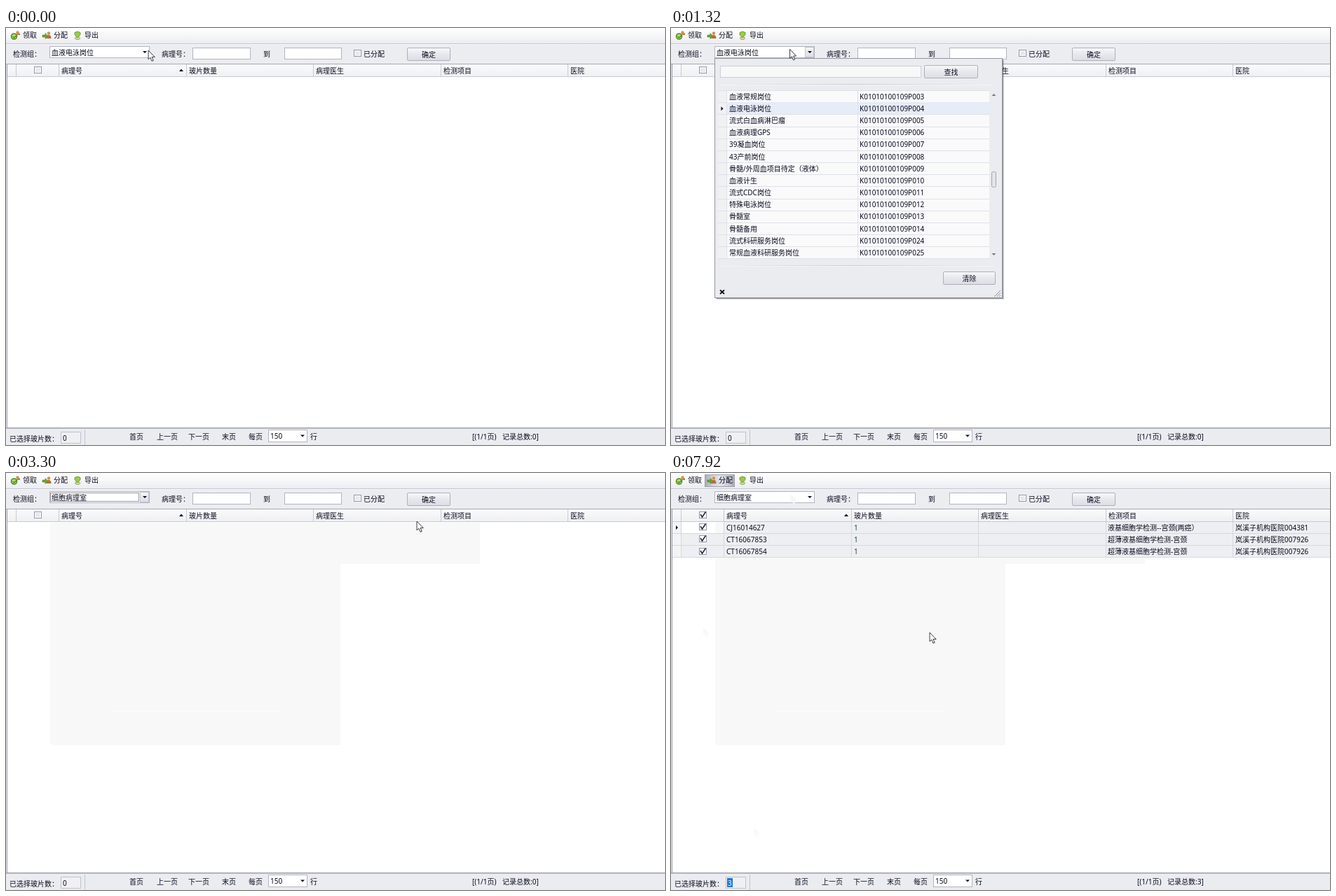
Animation, 940 px wide and 596 px high, one loop 8000 ms. Source, as an HTML page:

```html
<!DOCTYPE html>
<html lang="zh-CN">
<head>
<meta charset="utf-8">
<title>玻片分配</title>
<style>
html, body { margin: 0; width: 100%; height: 100%; overflow: hidden; background: #fff; }
svg { display: block; width: 940px; height: 596px; }
text { font-family: "Noto Sans", "Noto Sans CJK SC", "Noto Sans CJK", sans-serif; white-space: pre; }
</style>
</head>
<body>
<svg id="stage" viewBox="0 0 940 596" xmlns="http://www.w3.org/2000/svg"></svg>
<script>
const NS = 'http://www.w3.org/2000/svg';
const STEP = 330, LOOP = 8000, INK = '#0a0a1e', EDGE = '#b2b4c0';
const stage = document.getElementById('stage');
const layers = [];
let host = stage;

function el(tag, attrs, parent = host) {
  const node = document.createElementNS(NS, tag);
  for (const key in attrs) node.setAttribute(key, attrs[key]);
  parent.appendChild(node);
  return node;
}
function gradient(id, stops, across) {
  const g = el('linearGradient', across ? { id } : { id, x2: 0, y2: 1 }, stage);
  stops.forEach(([color, alpha = 1], i) =>
    el('stop', { offset: i / (stops.length - 1), 'stop-color': color, 'stop-opacity': alpha }, g));
}
const rect = (x, y, width, height, fill, more) => el('rect', { x, y, width, height, fill, ...more });
const box = (x, y, w, h, fill = '#fff', stroke = EDGE, more) =>
  rect(x + .5, y + .5, w - 1, h - 1, fill, { stroke, ...more });
const path = (d, fill, more) => el('path', { d, fill, ...more });
const stroke = (d, color, width = 1, more) =>
  path(d, 'none', { stroke: color, 'stroke-width': width, ...more });
const hline = (x1, x2, y, color) => rect(x1, y, x2 - x1, 1, color);
const vline = (x, y1, y2, color) => rect(x, y1, 1, y2 - y1, color);
function label(x, middle, words, size = 10, fill = INK, more) {
  const node = el('text', { x, y: middle + size * .37, 'font-size': size, fill, ...more });
  node.textContent = words;
}
// Everything drawn inside is visible for steps from <= n < to.
function layer(from, to, draw) {
  const outer = host;
  host = el('g', {}, outer);
  layers.push({ node: host, from, to });
  draw();
  host = outer;
}
function button(x, y, w, h, words, fill = 'url(#button)') {
  box(x, y, w, h, fill, '#adafbc', { rx: 1.5 });
  label(x + w / 2, y + h / 2 + .8, words, 10, INK, { 'text-anchor': 'middle' });
}
const triangle = (x, y, h = 3, fill = INK) => path(`M${x} ${y}h6l-3 ${h}z`, fill);
function checkbox(x, y, checked) {
  box(x, y, 11, 10, '#fff', '#9496a4');
  if (checked) stroke(`M${x + 2} ${y + 4}l2.5 4l5 -7.5`, '#262636', 1.6);
  else rect(x + 2, y + 2, 7, 6, '#e8e9ee');
}

gradient('toolbar', [['#fefefe'], ['#f7f7f9'], ['#ebecf0']]);
gradient('header', [['#fafafb'], ['#eff0f3']]);
gradient('button', [['#f8f8fa'], ['#e7e8ed'], ['#dcdee5']]);
gradient('hover', [['#ffffff'], ['#eef0f6'], ['#e4e7f0']]);
gradient('pressed', [['#a9abb4'], ['#cfd1d7'], ['#e3e4e8'], ['#cfd1d7'], ['#a9abb4']], true);
gradient('rule', [['#c9cbd3', 0], ['#c9cbd3'], ['#c9cbd3', 0]], true);
gradient('mist', [['#cbd5ce'], ['#d9e0da'], ['#dfe5df'], ['#cad3cb']]);
gradient('dusk', [['#8d9791', 0], ['#8d9791', .35], ['#6c7771', .8]], true);
gradient('shore', [['#4a544f', 0], ['#4a544f', .75], ['#6c7771', .3]]);

const COLUMNS = [14, 75, 257, 438, 620, 801];

function drawToolbar() {
  rect(0, 0, 940, 22, 'url(#toolbar)');
  hline(0, 940, 22, '#c3c5cf');
  layer(23, 25, () => box(48, 2, 43, 18, 'url(#pressed)', '#9fa1ab'));
  el('circle', { cx: 11.5, cy: 12, r: 4, fill: '#b7d977', stroke: '#4f8d1c', 'stroke-width': 1.6 });
  stroke('M9.5 12l2 2l4 -4', '#4f8d1c', 1.4);
  path('M13 10h7v-2l-2 -1z', '#b97a3d');
  el('circle', { cx: 16.5, cy: 6.5, r: 2.2, fill: '#c99354' });
  path('M52 10h4v-2.5l4 4l-4 4v-2.5h-4z', '#68a52c', { stroke: '#4c8320', 'stroke-width': .6 });
  el('circle', { cx: 61, cy: 7.5, r: 2.2, fill: '#c99354' });
  path('M57.5 15q0 -5 3.5 -5t3.5 5z', '#b56f35');
  el('ellipse', { cx: 102, cy: 14.5, rx: 3.6, ry: 1.8, fill: '#e9dfb0', stroke: '#8a9a45' });
  path('M98 6.5q4 -3 8 0v3l-4 4.5l-4 -4.5z', '#9ccb45', { stroke: '#5a8f26', 'stroke-width': .8 });
  [[24, '领取'], [68, '分配'], [112, '导出']].forEach(([x, s]) => label(x, 10.5, s));
}

function drawFilters() {
  rect(0, 23, 940, 28, '#ecedf1');
  hline(0, 940, 23, '#fafafb');
  hline(0, 940, 51, '#a7a9b6');
  label(10, 37.5, '检测组：');
  box(62, 26, 143, 17);
  layer(14, 25, () => ghost(170, 30, '#f6f6f7'));
  layer(0, 10, () => label(65, 35, '血液电泳岗位'));
  layer(10, 25, () => label(65, 35, '细胞病理室'));
  layer(3, 12, () => box(191, 27, 13, 15, 'url(#button)', '#c3c5cf'));
  layer(10, 12, () => box(63, 28, 127, 13, 'none', '#333', { 'stroke-dasharray': '1 1' }));
  triangle(195, 33);
  label(222, 37, '病理号：');
  box(266, 28, 83, 17);
  label(367, 37, '到');
  box(397, 28, 82, 17);
  checkbox(496, 31);
  label(510, 37.5, '已分配');
  button(572, 28, 62, 19, '确定');
  layer(11, 13, () => button(572, 28, 62, 19, '确定', 'url(#hover)'));
}

function drawHeader() {
  rect(0, 52, 940, 17, 'url(#header)');
  hline(0, 940, 69, '#c8cad2');
  COLUMNS.forEach(x => vline(x, 52, 69, '#c8cad2'));
  layer(0, 16, () => checkbox(40, 55));
  layer(16, 25, () => checkbox(40, 55, true));
  ['病理号', '玻片数量', '病理医生', '检测项目', '医院']
    .forEach((s, i) => label(COLUMNS[i + 1] + 4, 61, s));
  path('M247 62h6l-3 -3.5z', INK);
  rect(0, 52, 1, 520, '#e9e9ee');
  vline(1, 52, 572, '#9c9eab');
}

function drawRows() {
  const mid = i => 78 + i * 17.25;
  const tint = fill => path('M76 70H940V121H15V87H76z', fill);
  layer(16, 20, () => tint('#e0e9fb'));
  layer(20, 25, () => tint('#eeeff2'));
  rect(2, 70, 12, 51, '#f4f4f6');
  [86, 103, 120].forEach(y => hline(2, 940, y, '#d6d8de'));
  COLUMNS.forEach(x => vline(x, 70, 121, '#d6d8de'));
  path('M7 75l3 3l-3 3z', INK);
  const records = [
    ['CJ16014627', '液基细胞学检测--宫颈(两癌）', '岚溪子机构医院004381'],
    ['CT16067853', '超薄液基细胞学检测-宫颈', '岚溪子机构医院007926'],
    ['CT16067854', '超薄液基细胞学检测-宫颈', '岚溪子机构医院007926']];
  records.forEach(([code, test, place], i) => {
    label(79, mid(i), code);
    label(261, mid(i), '1', 10, '#1d4a35');
    label(623, mid(i), test);
    label(805, mid(i), place);
    const y = Math.round(mid(i)) - 6;
    layer(13, 16, () => checkbox(40, y));
    layer(16, 25, () => checkbox(40, y, true));
  });
  layer(16, 20, () => box(15, 70, 60, 16, 'none', '#444', { 'stroke-dasharray': '1 1' }));
}

function drawFooter() {
  rect(0, 572, 940, 24, '#ebecf0');
  rect(0, 571, 940, 1.5, '#9c9eab');
  vline(112, 574, 596, '#c3c5cf');
  label(5, 587, '已选择玻片数：');
  box(78, 577, 29, 17, '#f0f0f3', '#c0c2cc');
  layer(0, 16, () => label(81, 586.5, '0'));
  layer(16, 20, () => label(81, 586.5, '3'));
  layer(20, 25, () => {
    rect(80, 579, 8, 13, '#1979d3');
    label(81, 586.5, '3', 10, '#fff');
  });
  [[176, '首页'], [215, '上一页'], [260, '下一页'], [308, '末页'], [346, '每页'], [434, '行']]
    .forEach(([x, s]) => label(x, 584, s));
  box(374, 574, 56, 18);
  label(377, 583.5, '150');
  triangle(420, 581.5);
  label(665, 584, '[(1/1页)');
  layer(0, 13, () => label(708, 584, '记录总数:0]'));
  layer(13, 25, () => label(708, 584, '记录总数:3]'));
}

function drawList(rows, mark) {
  const pitch = 17.17, top = 89;
  rect(67, top, 387, 240, '#fafafb');
  rect(67, top, 13, rows.length * pitch, '#f1f1f4');
  rows.forEach(([name, code], i) => {
    const y = top + i * pitch;
    if (i === mark) rect(80, y, 374, pitch, '#e6ecf8');
    hline(67, 454, Math.round(y + pitch), '#dfe1e7');
    label(83, y + 9, name);
    label(269, y + 9, code);
  });
  hline(67, 454, top, '#dfe1e7');
  [79, 266].forEach(x => vline(x, top, top + rows.length * pitch, '#dfe1e7'));
  const y = top + mark * pitch + 9;
  path(`M71.5 ${y - 3}l3 3l-3 3z`, INK);
}

function drawPopup() {
  rect(65, 46, 410, 342, '#000', { opacity: .16 });
  rect(64, 45, 410, 342, '#000', { opacity: .3 });
  box(62, 43, 411, 343, '#ebecf0', '#9395a2');
  box(70, 54, 287, 17, '#f8f8f9', '#cccfd7');
  button(361, 53, 77, 19, '查找');
  rect(70, 80, 390, 1, 'url(#rule)');
  rect(70, 81, 390, 1, '#fff', { opacity: .5 });
  rect(70, 339, 390, 1, 'url(#rule)');
  rect(70, 340, 390, 1, '#fff', { opacity: .5 });
  button(388, 348, 75, 19, '清除');
  stroke('M70 374.5l6 5.5M76 374.5l-6 5.5', '#111', 1.8);
  stroke('M461 384l9 -9M464.5 384l5.5 -5.5M468 384l2 -2', '#8f919d');

  const code = n => 'K01010100109P' + String(n).padStart(3, '0');
  const names = ['血液常规岗位', '血液电泳岗位', '流式白血病淋巴瘤', '血液病理GPS', '39凝血岗位',
    '43产前岗位', '骨髓/外周血项目待定（液体）', '血液计生', '流式CDC岗位', '特殊电泳岗位',
    '骨髓室', '骨髓备用', '流式科研服务岗位', '常规血液科研服务岗位'];
  const all = names.map((name, i) => [name, code(i < 12 ? i + 3 : i + 12)]);
  const found = [['细胞遗传室', code(31)], ['细胞病理室', code(32)]];
  layer(3, 7, () => {
    drawList(all, 1);
    box(457, 205, 7, 23, '#e3e4ea', '#a4a6b3', { rx: 2 });
    triangle(457.5, 322, 3, '#777987');
    path('M457.5 97h6l-3 -3z', '#777987');
  });
  layer(7, 9, () => drawList(found, 0));
  layer(9, 10, () => drawList(found, 1));
  layer(3, 4, () => vline(73, 56, 68, '#111'));
  layer(6, 10, () => label(73, 62.5, '细胞'));
}

function drawLandscape() {
  const dark = '#38423e';
  rect(550, 74, 125, 55.5, 'url(#dusk)', { rx: 4 });
  path('M570 110q28 -10 50 -9t56 -11v20z', '#7e8983', { opacity: .5 });
  path('M638 109q4 -18 14 -22t24 -3v25z', '#5a655f', { opacity: .55 });
  rect(598, 106, 77, 22, 'url(#shore)');
  path('M604 97q12 -3 19 -12q7 9 20 12l-3 2h-33z', dark);
  rect(610, 99, 27, 9, '#5f6a64', { opacity: .55 });
  [609, 617, 627, 635].forEach(x => rect(x, 98, 2, 11, dark));
  path('M600 108h76v4l-40 2l-36 -2z', dark, { opacity: .8 });
  stroke('M647 108q2 -14 -3 -22M655 108q-2 -15 8 -24M664 108q0 -13 8 -17', '#434d48');
  stroke('M605 118h62M602 123h70', dark, 1.2, { opacity: .5 });
  [[578, 83], [584, 81], [589, 86], [579, 89], [585, 91]].forEach(([x, y]) =>
    stroke(`M${x - 2} ${y - 1}q2 -1 2 1q1 -2 3 -1`, '#4a544e'));
}

function drawCandidates() {
  const tone = '#23423f';
  rect(78.5, 73.5, 597, 56.5, 'url(#mist)', { rx: 5, stroke: '#b1bab3' });
  drawLandscape();
  label(88, 89.5, "xi'bc", 13, tone, { 'font-weight': 600 });
  vline(116, 83, 97, '#223');
  label(148, 89.5, "[xi'bao]", 13, '#f47a10', { 'font-weight': 600 });
  hline(88, 570, 102, '#b9c3bb');
  ['细胞', '喜报', '喜宝', '西宝', '希宝', '西堡', '稀薄'].forEach((word, i) =>
    label(88 + i * 49.8, 117, `${i + 1}.${word}`, 13, tone));
  label(426, 117, '(bó)', 10, tone);
  label(457, 117, '8.铣', 13, tone);
  label(482, 117, '(xiān)', 10, tone);
  label(509, 117, '刨', 13, tone);
  label(533, 117, '9.西', 13, tone);
  path('M576 113v9l-5 -4.5z', '#9aa79b');
  path('M580.5 113v9l5.5 -4.5z', tone);
}

const ARROW = 'M0 0V12.8L2.9 10.2L5 15.3L7.2 14.4L5.1 9.5H9.2Z';
const ghost = (x, y, fill = '#f9f9f9') => path(ARROW, fill, { transform: `translate(${x} ${y})` });

rect(0, 0, 940, 596, '#fff');
layer(6, 25, () => rect(473, 73, 203, 57, '#f8f8f8', { rx: 2 }));
layer(10, 25, () => {
  path('M63 71H676V130H477V389H66L63 386z', '#f8f8f8');
  hline(150, 392, 340, '#fff');
});
layer(17, 25, () => ghost(46, 220));
layer(18, 25, () => ghost(118, 506));
drawToolbar();
drawFilters();
drawHeader();
layer(13, 25, drawRows);
drawFooter();
layer(2, 10, drawPopup);
layer(5, 6, drawCandidates);

const arrow = path(ARROW, '#fff', { stroke: '#26262e', 'stroke-width': .9 });
const beam = stroke('M-2.5 .5h2l.5 .5l.5 -.5h2M0 1v11M-2.5 12.5h2l.5 -.5l.5 .5h2', '#222', 1);

// Pointer position from each step on; the fourth value marks the text beam.
const POINTER = [
  [0, 203, 32], [1, 172, 30], [2, 169.5, 30.5], [7, 171, 35], [8, 261, 104], [9, 255, 113],
  [10, 586, 69], [11, 605, 34], [12, 440, 99], [13, 261, 93], [14, 47, 70], [15, 46, 61],
  [16, 46, 220], [17, 118, 506], [18, 101, 577], [19, 97.5, 583, 1], [20, 64, 583, 1],
  [21, 96, 162], [22, 74, 23], [23, 66, 11], [24, 369, 228]];

let shown = -1;
function show(step) {
  if (step === shown) return;
  shown = step;
  for (const { node, from, to } of layers)
    node.style.display = step >= from && step < to ? '' : 'none';
  const [, x, y, typing] = POINTER.filter(p => p[0] <= step).pop();
  for (const [node, on] of [[arrow, !typing], [beam, typing]]) {
    node.style.display = on ? '' : 'none';
    node.setAttribute('transform', `translate(${x} ${y})`);
  }
}
const start = performance.now();
function tick() {
  show(Math.floor(((performance.now() - start) % LOOP) / STEP));
  requestAnimationFrame(tick);
}
tick();
</script>
</body>
</html>
```
